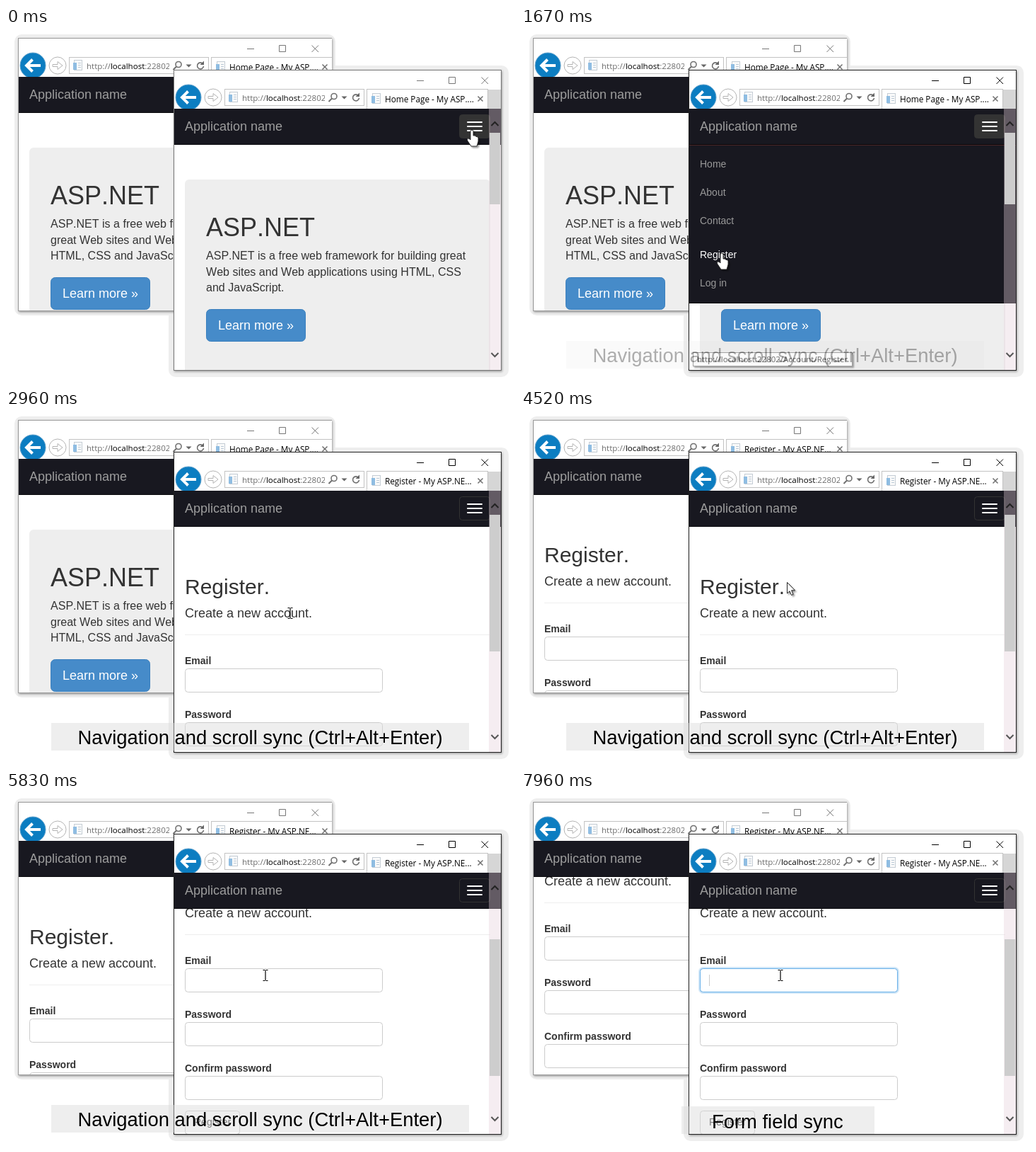
An HTML page that plays this animation: 720 px wide and 500 px high, repeating every 7990 ms.

```html
<!DOCTYPE html>
<html lang="en">
<head>
<meta charset="utf-8">
<title>Browser sync</title>
<style>
html, body { margin: 0; width: 100%; height: 100%; overflow: hidden; background: #fff; }
svg { display: block; width: 720px; height: 500px; font-family: "Liberation Sans", Arial, sans-serif; font-kerning: none; fill: #333; }
text { white-space: pre; }
.ui { font-family: "Open Sans", "Noto Sans", sans-serif; font-size: 11.75px; fill: #000; }
.url { font-size: 11.55px; fill: #6d6d6d; }
.line { fill: none; stroke: #707070; }
.field { fill: #fff; stroke: #ccc; }
.label { font-size: 14px; font-weight: bold; }
.caption { font-size: 27.4px; fill: #000; }
</style>
</head>
<body>
<svg id="stage" viewBox="0 0 720 500"></svg>
<script>
const LOOP = 7990;
const rect = (x, y, w, h, fill, extra = '') =>
  `<rect x="${x}" y="${y}" width="${w}" height="${h}" fill="${fill}" ${extra}/>`;
const text = (x, y, size, str, extra = '') =>
  `<text x="${x}" y="${y}" font-size="${size}" ${extra}>${str}</text>`;
const path = (d, extra = 'class="line"') => `<path d="${d}" ${extra}/>`;

const favicon = (x, y) => `<g transform="translate(${x} ${y})">
  ${rect(2.5, .5, 11, 14, '#fafafa', 'stroke="#c4ccd4"')}
  ${rect(1, 4, 5, 10, '#8fbde2')}
  ${path('M8 4.5H12M8 7.5H12M8 10.5H12', 'stroke="#b9c8d5"')}</g>`;

const chrome = (id, right, iconShift) => `
  ${rect(238, 60, right - 238, 54, '#fff')}
  <g id="${id}Buttons" fill="none" stroke="#777" transform="translate(${iconShift} 0)">
    ${path('M581 74.5H591M626.5 69.5H635.5V78.5H626.5ZM672.5 69.5L682 79M682 69.5L672.5 79', '')}
  </g>
  <circle cx="258" cy="98" r="18" fill="#0c7dc1" stroke="#5d9fcb"/>
  ${path('M269 98H250M257.5 89.5L249 98L257.5 106.5', 'fill="none" stroke="#fff" stroke-width="4"')}
  <circle cx="293" cy="98" r="12" fill="#fff" stroke="#b4b4b4"/>
  ${path('M286 96.5H293V92.5L300 98L293 103.5V99.5H286Z', 'fill="#fff" stroke="#b4b4b4"')}
  ${rect(309.5, 86.5, 197, 23, '#fff', 'stroke="#c3c3c3"')}
  ${favicon(314, 90)}
  <text class="ui url" x="334" y="102.5" clip-path="url(#urlClip)">http://<tspan fill="#000">localhost</tspan>:22802/</text>
  <circle cx="464" cy="96.5" r="4" class="line" stroke-width="1.6"/>
  ${path('M461 99.5L456.5 104', 'class="line" stroke-width="2"')}
  ${path('M474.5 96.5H482.5L478.5 100.5Z', 'fill="#666"')}
  ${path('M498.5 95.5A4.5 4.5 0 1 0 499.5 99', 'class="line" stroke-width="1.7"')}
  ${path('M500 91.5V97H494.5Z', 'fill="#666"')}
  ${rect(510.5, 86.5, 171, 28, '#fff', 'stroke="#c3c3c3"')}
  ${favicon(516, 92)}
  <text id="${id}Title" class="ui" x="536" y="104.5"></text>
  ${path('M667.5 96.5L674.5 103.5M674.5 96.5L667.5 103.5', 'class="line" stroke-width="1.5"')}`;

const navbar = `
  ${rect(238, 114, 462, 51, '#181820')}
  ${rect(238, 164, 462, 1, '#08080c')}
  ${text(253, 145, 18, 'Application name', 'fill="#9d9d9d"')}`;

const home = (lines) => `
  ${rect(253, 214, 432, 320, '#eee', 'rx="6"')}
  ${text(283, 294, 36, 'ASP.NET')}
  ${lines.map((s, i) => text(283, 327 + Math.round(i * 22.6), 16.05, s)).join('')}
  ${rect(283.5, 397.5, 140, 45, '#468bc9', 'rx="6" stroke="#3a7fbd"')}
  ${text(300, 426, 18, 'Learn more »', 'fill="#fff"')}`;

const field = (y, label) => `
  <text class="label" x="253" y="${y - 6}">${label}</text>
  <rect class="field" x="253.5" y="${y + .5}" width="279" height="33" rx="4"/>`;

const register = `
  ${text(253, 260, 30, 'Register.')}
  ${text(253, 293, 18, 'Create a new account.')}
  ${rect(253, 317, 432, 1, '#eee')}
  ${field(365, 'Email')}${field(441, 'Password')}${field(517, 'Confirm password')}
  ${rect(253.5, 566.5, 77, 33, '#fff', 'rx="4" stroke="#ccc"')}
  ${text(266, 587, 14, 'Register')}`;

const menuItems = [['Home', 192], ['About', 232], ['Contact', 272], ['Register', 320], ['Log in', 360]];
const clip = (id, x, y, w, h) => `<clipPath id="${id}">${rect(x, y, w, h, '#000')}</clipPath>`;
const band = (id, x, y, w, str, tx, ty) => `<g id="${id}">
  ${rect(x, y, w, 39, '#d9d9d9', 'fill-opacity=".45"')}
  <text class="caption" x="${tx}" y="${ty}">${str}</text></g>`;

document.getElementById('stage').innerHTML = `
<defs>
  ${clip('urlClip', 330, 86, 121, 24)}
  ${clip('backClip', 238, 60, 443, 384)}
  ${clip('frontClip', 238, 60, 462, 423)}
  ${clip('pageClip', 238, 114, 462, 370)}
  <clipPath id="menuClip"><rect id="menuMask" x="238" y="165" width="462" height="0"/></clipPath>
  <filter id="shade" x="-50%" y="-50%" width="220%" height="220%">
    <feDropShadow dx="2" dy="2" stdDeviation="1.2" flood-opacity=".4"/>
  </filter>
  <filter id="lift">
    <feDropShadow dx="1" dy="1.5" stdDeviation="1.8" flood-opacity=".35"/>
  </filter>
</defs>
${rect(12, 9, 454, 397, '#eee', 'rx="10"')}
${rect(230, 53, 481, 440, '#eee', 'rx="10"')}

<g transform="translate(-220 -45)">
  ${rect(237.5, 59.5, 443, 385, '#fff', 'stroke="#999" filter="url(#lift)"')}
  <g clip-path="url(#backClip)">
    ${chrome('back', 681, -20)}
    <g clip-path="url(#pageClip)">
      <g id="backHome">${home(['ASP.NET is a free web framework for building', 'great Web sites and Web applications using', 'HTML, CSS and JavaScript.'])}</g>
      <g id="backRegister">${register}</g>
    </g>
    ${navbar}
  </g>
</g>

<rect id="frame" x="237.5" y="59.5" width="463" height="424" fill="#fff" filter="url(#lift)"/>
<g clip-path="url(#frontClip)">
  ${chrome('front', 700, 0)}
  ${rect(682, 87, 18, 27, '#d6d6d6')}
  <g clip-path="url(#pageClip)">
    <g id="frontHome">${home(['ASP.NET is a free web framework for building great', 'Web sites and Web applications using HTML, CSS', 'and JavaScript.'])}</g>
    <g id="frontRegister">${register}
      <g id="focus">
        ${rect(252.5, 364.5, 281, 35, 'none', 'rx="5" stroke="#66afe9" stroke-opacity=".3" stroke-width="3"')}
        ${rect(253.5, 365.5, 279, 33, '#fff', 'rx="4" stroke="#66afe9"')}
        ${rect(266, 374, 1, 16, '#000', 'id="caret"')}
      </g>
    </g>
  </g>
  ${navbar}
  <rect id="toggle" x="641.5" y="122.5" width="43" height="33" rx="4" stroke="#333"/>
  ${[132, 138, 144].map(y => rect(652, y, 22, 2, '#fff', 'rx="1"')).join('')}
  <g clip-path="url(#menuClip)">
    ${rect(238, 165, 462, 224, '#181820')}
    ${rect(238, 165, 462, 1, '#4a2626')}
    ${rect(238, 388, 462, 1, '#08080c')}
    ${menuItems.map(([s, y]) => text(253, y + 5, 14, s, 'class="item"')).join('')}
  </g>
  <g id="scrollbar">
    ${rect(683, 114, 17, 370, '#e4cdd8', 'fill-opacity=".37"')}
    <rect id="thumb" x="684" width="15" fill="#cdcdcd"/>
    ${path('M686.5 138L691.5 133L696.5 138', 'fill="none" stroke="#222" stroke-width="2"')}
    ${path('M686.5 459L691.5 464L696.5 459', 'fill="none" stroke="#555" stroke-width="2"')}
  </g>
  <g id="status">
    ${rect(243.5, 458.5, 225, 19, '#fff', 'stroke="#999" filter="url(#shade)"')}
    <text class="ui" x="249" y="472" style="font-size:11.5px;fill:#575757">http://localhost:22802/Account/Register</text>
  </g>
</g>

<g id="cursor">
  ${path('M-3 2A2 2 0 0 1 1 2V8Q4.4 7.4 4.8 9.4Q8 9 8 11.5V16L6 23H-2L-7 15.5Q-8.4 12.6-6.6 12Q-5 11.6-3 14Z', 'id="hand" fill="#fff" stroke="#222" stroke-width=".9" filter="url(#shade)"')}
  ${path('M.5.5V16L4 12.8L6.5 18.5L9 17.4L6.6 11.8H11.5Z', 'id="arrow" fill="#fff" stroke="#222" filter="url(#shade)"')}
  ${path('M-3.5-7.5H-.5M.5-7.5H3.5M0-7V7M-3.5 7.5H-.5M.5 7.5H3.5', 'id="beam" stroke="#000" stroke-width="1.2"')}
</g>
${band('navCaption', 64, 442, 591, 'Navigation and scroll sync (Ctrl+Alt+Enter)', 101.5, 472)}
${band('formCaption', 227, 444, 273, 'Form field sync', 270, 475)}`;

const el = {};
document.querySelectorAll('[id]').forEach(e => el[e.id] = e);
const items = [...document.querySelectorAll('.item')];

const progress = (t, start, end) => Math.min(1, Math.max(0, (t - start) / (end - start)));
const smooth = p => p * p * (3 - 2 * p);
const easeOut = p => 1 - (1 - p) ** 3;
const show = (e, on) => e.style.display = on ? '' : 'none';

// time, x, y
const route = [
  [0, 660, 144], [60, 664, 146], [150, 663, 140], [700, 663, 140], [1140, 470, 236],
  [1640, 285, 318], [2400, 285, 318], [2700, 303, 317], [2770, 306, 315], [2960, 402, 287],
  [4370, 402, 287], [4520, 376, 243], [4680, 366, 224], [5100, 367, 259], [LOOP, 367, 259]
];
function cursorAt(t) {
  const i = route.findIndex(k => k[0] > t);
  const [t0, x0, y0] = route[i - 1], [t1, x1, y1] = route[i];
  const p = smooth(progress(t, t0, t1));
  return [Math.round(x0 + (x1 - x0) * p), Math.round(y0 + (y1 - y0) * p)];
}

function render(t) {
  const active = t >= 350, registered = t >= 2300, backRegistered = t >= 3980;
  el.frame.setAttribute('stroke', active ? '#222' : '#777');
  el.frontButtons.setAttribute('stroke', active ? '#000' : '#777');

  const homeTitle = 'Home Page - My ASP....', registerTitle = 'Register - My ASP.NE...';
  el.frontTitle.textContent = registered ? registerTitle : homeTitle;
  el.backTitle.textContent = t >= 3720 ? registerTitle : homeTitle;
  show(el.frontHome, !registered);
  show(el.frontRegister, registered);
  show(el.backHome, !backRegistered);
  show(el.backRegister, backRegistered);

  const scroll = Math.round(116 * easeOut(progress(t, 5260, 5920)));
  el.frontRegister.setAttribute('transform', `translate(0 ${-scroll})`);
  el.backRegister.setAttribute('transform', `translate(0 ${t >= 6520 ? -116 : 0})`);
  show(el.scrollbar, !registered || t >= 2800);
  el.thumb.setAttribute('y', 148 + Math.round(scroll * 60 / 116));
  el.thumb.setAttribute('height', registered ? 193 : 101);

  const [x, y] = cursorAt(t);
  el.toggle.setAttribute('fill', registered ? '#181820' : '#333');
  el.menuMask.setAttribute('height', registered ? 0 : 224 * smooth(progress(t, 400, 750)));
  items.forEach((item, i) => {
    const hover = Math.abs(y - menuItems[i][1]) < 20 && y > 170;
    item.setAttribute('fill', hover ? '#fff' : '#999');
  });
  show(el.status, !registered && y > 300);

  el.cursor.setAttribute('transform', `translate(${x} ${y})`);
  const beam = (t >= 2900 && t < 4400) || scroll >= 105;
  show(el.hand, !registered);
  show(el.beam, registered && beam);
  show(el.arrow, registered && !beam);

  const swap = progress(t, 6720, 7230);
  el.navCaption.setAttribute('opacity', progress(t, 1510, 2020) * (1 - swap));
  el.formCaption.setAttribute('opacity', swap);
  el.focus.setAttribute('opacity', progress(t, 7460, 7670));
  el.caret.setAttribute('opacity', 1 - .8 * progress(t, 7840, 7960));
}

const start = performance.now();
function tick() {
  render((performance.now() - start) % LOOP);
  requestAnimationFrame(tick);
}
tick();
</script>
</body>
</html>
```
